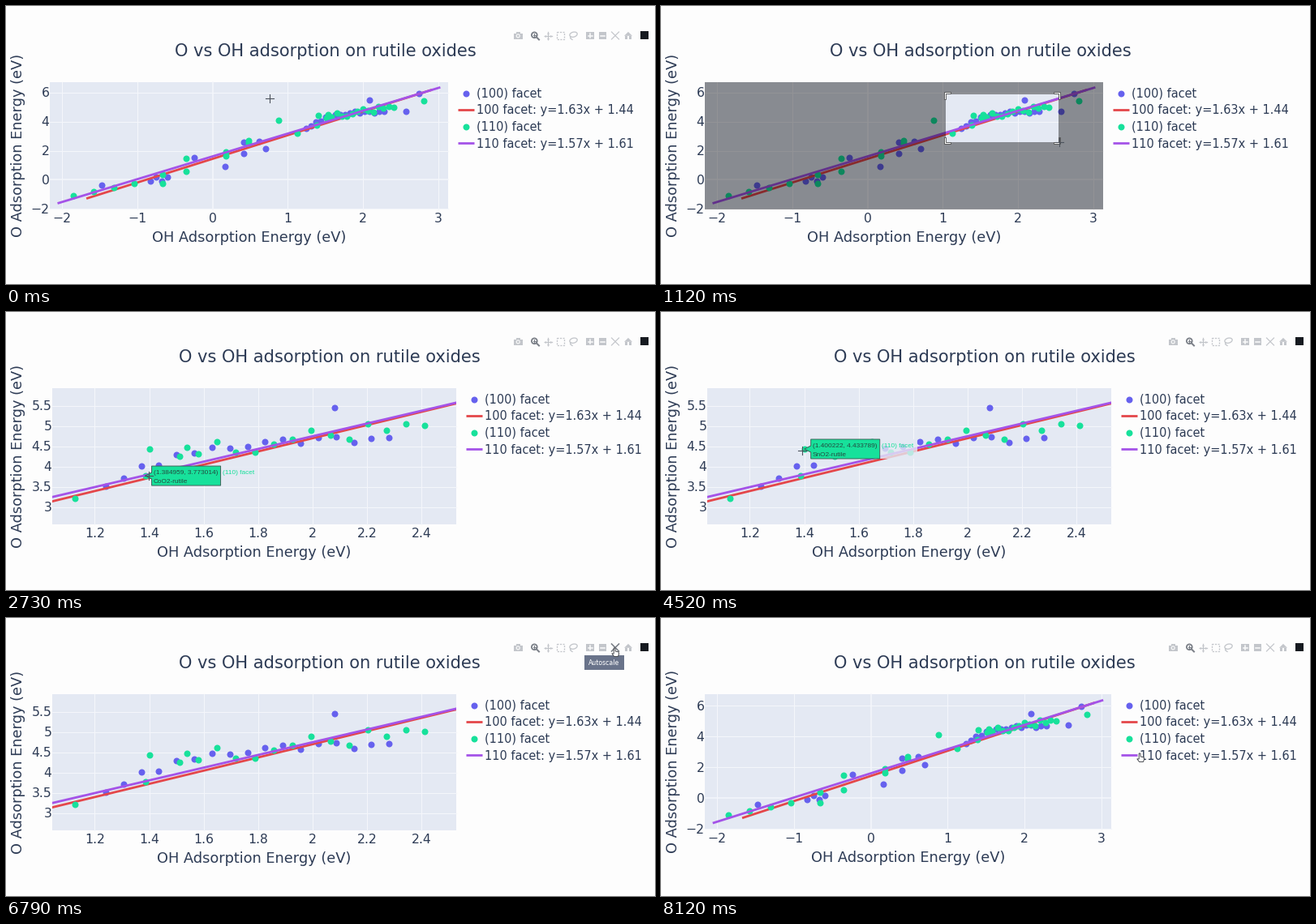
These frames come from a looping animation (800x343 px, 8180 ms). A matplotlib script:

```python
import numpy as np
import matplotlib.pyplot as plt
from matplotlib.animation import FuncAnimation
from matplotlib.patches import Circle, Ellipse, PathPatch, Polygon, Rectangle
from matplotlib.path import Path

W, H, DPI = 800, 343, 64
STEP, LOOP = 20, 8180
PT = 72 / DPI  # points per pixel

INK, PLOT_BG, GRID, PAGE = "#2d3b55", "#e4e9f3", "#f4f6fb", "#fdfdfd"
BLUE, RED, GREEN, VIOLET = "#6661ee", "#e4474a", "#17e19b", "#a453e8"

FADE_AT, DRAG_AT, ZOOM_AT, RESET_AT = 420, 480, 1300, 7000

# start, end, x, y, compound
HOVERS = [(2150, 3960, 1.384959, 3.773014, "CoO2"),
          (4240, 5440, 1.400222, 4.433789, "SnO2"),
          (5500, 5660, 1.53863, 4.471249, "HfO2")]

# start, end, destination of each pointer move
HOME, DRAG_FROM = np.array([325, 114]), np.array([351, 108.5])
MOVES = [(30, 400, DRAG_FROM), (DRAG_AT, 1040, (491, 168)), (1250, 2200, (176, 202)),
         (3730, 4480, (174, 171)), (5270, 6450, (750, 37)), (7200, 8060, (590, 167))]

rng = np.random.default_rng(4)


def run(n, x0, x1, rule, noise=0):
    x = np.linspace(x0, x1, n)
    return np.column_stack([x, rule(x) + rng.uniform(-noise, noise, n)])


def pair(x, y, gap):
    return [(x, y - gap), (x, y + gap)]


# strong binders lie on a loose line, weak binders level off into a cluster
FACET_100 = np.vstack([
    run(4, -.825, -.6, lambda x: .06 - .13 * np.cos(np.pi * (x + .825) / .075)),
    run(17, 1.24, 2.28, lambda x: 4.7 - 1.2 * np.exp((1.24 - x) / .28), .1),
    pair(.41, 2.19, .39),
    [(-1.47, -.39), (-.243, 1.52), (.166, .9), (.62, 2.67), (.705, 2.16)],
    [(2.081, 5.46), (2.57, 4.73), (2.735, 5.94)]])
FACET_110 = np.vstack([
    run(4, -1.85, -1.04, lambda x: x + .76),
    pair(-.664, .04, .32), pair(-.354, 1.01, .45),
    pair(.18, 1.76, .14), pair(.48, 2.6, .09),
    run(14, 1.51, 2.41, lambda x: 4.25 + .85 * (x - 1.5), .25),
    [h[2:4] for h in HOVERS],
    [(.877, 4.09), (1.126, 3.22), (2.81, 5.41)]])

fig = plt.figure(figsize=(W / DPI, H / DPI), dpi=DPI, facecolor=PAGE)
ax = fig.add_axes([0, 0, 1, 1])
ax.set(xlim=(0, W), ylim=(H, 0))
ax.axis("off")


def label(x, y, text, size, color=INK, ha="left", z=5, font="DejaVu Sans"):
    return ax.text(x, y + .36 * size, text, fontsize=size * PT, color=color,
                   ha=ha, va="baseline", family=font, zorder=z)


def line(xs, ys, color, width, z=3, **kw):
    return ax.plot(xs, ys, color=color, lw=width * PT, zorder=z, **kw)[0]


def dots(xs, ys, color, z=3):
    return ax.plot(xs, ys, "o", color=color, ms=8 * PT, mew=0, zorder=z)[0]


def box(x0, y0, x1, y1, color, z=1, **kw):
    return ax.add_patch(Rectangle((x0, y0), x1 - x0, y1 - y0, fc=color, lw=0,
                                  zorder=z, **kw))


def shape(points, color, z, **kw):
    return ax.add_patch(Polygon(points, fc=color, zorder=z, **kw))


def tick_text(v):
    return f"{round(v, 1):g}".replace("-", "\u2212")


class View:
    """The whole chart for one pair of axis ranges."""

    def __init__(self, rect, xlim, ylim, xticks, yticks):
        self.rect, self.xlim, self.ylim = rect, xlim, ylim
        left, top, right, bottom = rect
        self.area = box(*rect, PLOT_BG)
        self.parts = [self.area]
        self.add_grid(xticks, yticks)
        self.add_traces()
        self.add_legend(right + 22.3)
        mid_x, mid_y = (left + right) / 2, (top + bottom) / 2
        self.parts += [
            label(right / 2 + 121.5, 54, "O vs OH adsorption on rutile oxides", 21,
                  ha="center"),
            label(mid_x, bottom + 34, "OH Adsorption Energy (eV)", 17.7, ha="center"),
            ax.text(20.2, mid_y, "O Adsorption Energy (eV)", color=INK,
                    fontsize=17.7 * PT, family="DejaVu Sans", rotation=90,
                    rotation_mode="anchor", ha="center", va="baseline")]

    def to_px(self, x, y):
        left, top, right, bottom = self.rect
        (x0, x1), (y0, y1) = self.xlim, self.ylim
        return (left + (right - left) * (x - x0) / (x1 - x0),
                bottom - (bottom - top) * (y - y0) / (y1 - y0))

    def add_grid(self, xticks, yticks):
        left, top, right, bottom = self.rect
        for t in xticks:
            x = self.to_px(t, 0)[0]
            self.parts += [line([x, x], [top, bottom], GRID, 1.6 if t == 0 else 1.1, 2),
                           label(x, bottom + 10.4, tick_text(t), 15.6, ha="center")]
        for t in yticks:
            y = self.to_px(0, t)[1]
            self.parts += [line([left, right], [y, y], GRID, 1.6 if t == 0 else 1.1, 2),
                           label(left - .5, y, tick_text(t), 15.6, ha="right")]

    def add_traces(self):
        red, violet = np.array([-1.66, 2.9]), np.array([-2.043, 3.01])
        traces = [
            dots(*self.to_px(*FACET_100.T), BLUE, 3),
            line(*self.to_px(red, 1.63 * red + 1.44), RED, 2.8, 3.1),
            dots(*self.to_px(*FACET_110.T), GREEN, 3.2),
            line(*self.to_px(violet, 1.57 * violet + 1.61), VIOLET, 2.8, 3.3)]
        for a in traces:
            a.set_clip_path(self.area)
        self.parts += traces

    def add_legend(self, x):
        rows = [("(100) facet", BLUE), ("100 facet: y=1.63x + 1.44", RED),
                ("(110) facet", GREEN), ("110 facet: y=1.57x + 1.61", VIOLET)]
        for i, (text, color) in enumerate(rows):
            y = 107.5 + 20.6 * i
            mark = (line([x - 10, x + 10], [y, y], color, 2.8, solid_capstyle="butt")
                    if i % 2 else dots([x], [y], color))
            self.parts += [mark, label(x + 13.2, y, text, 14.55)]


def build_toolbar():
    y, grey, dark = 36.5, "#c3c6cb", "#7b8088"
    parts = []

    def stroke(xs, ys, color=grey, width=1.3, **kw):
        parts.append(line(xs, ys, color, width, 6, **kw))

    def fill(x0, y0, x1, y1, color=grey):
        parts.append(box(x0, y0, x1, y1, color, 6))

    def outline(p, color=grey, width=1.3):
        p.set(facecolor="none", edgecolor=color, linewidth=width * PT, zorder=7)
        parts.append(ax.add_patch(p))

    # camera
    fill(626, y - 3, 636.5, y + 4)
    fill(629, y - 4.5, 633.5, y - 3)
    outline(Circle((631.2, y + .4), 2), PAGE, 1.1)
    # magnifier
    outline(Circle((651.3, y - .7), 3.4), dark, 1.8)
    stroke([653.8, 657], [y + 1.8, y + 5], dark, 2)
    stroke([649.6, 653], [y - .7] * 2, dark, 1)
    stroke([651.3] * 2, [y - 2.4, y + 1], dark, 1)
    # pan
    stroke([663.5, 672.5], [y, y])
    stroke([668, 668], [y - 4.5, y + 4.5])
    for angle, mark in zip(range(4), ">v<^"):
        turn = 4 * np.exp(.5j * np.pi * angle)
        stroke([668 + turn.real], [y + turn.imag], marker=mark, ms=2.8 * PT, mew=0)
    # box select and lasso
    outline(Rectangle((679, y - 4.5), 9, 9, ls=(0, (1.6, 1.1))))
    outline(Ellipse((699.5, y - 1.3), 9.5, 6, angle=-15))
    stroke([696, 695.6, 698], [y + 1.2, y + 3.2, y + 5])
    # zoom in and out
    for x in (720, 735.5):
        fill(x - 4.6, y - 4.6, x + 4.6, y + 4.6)
        stroke([x - 2.5, x + 2.5], [y, y], PAGE, 1.5)
    stroke([720, 720], [y - 2.5, y + 2.5], PAGE, 1.5)
    # autoscale
    for s in (-1, 1):
        stroke([746.5, 755.5], [y - 4.5 * s, y + 4.5 * s], width=1.2)
    # home
    parts.append(shape([(762, y + .3), (767, y - 4.6), (772, y + .3)], grey, 6, lw=0))
    fill(763.4, y, 766, y + 4.4)
    fill(768, y, 770.6, y + 4.4)
    # maker's badge
    fill(782.3, y - 5.2, 792.3, y + 4.8, "#161a20")
    return parts


def ramp(t, start, length):
    return min(max((t - start) / length, 0), 1)


def pointer(t):
    """Smooth moves between stops; the vertical part trails a little."""
    pos = HOME
    for start, end, goal in MOVES:
        u = ramp(t, start, end - start)
        s = u * u * (3 - 2 * u)
        pos = pos + (np.array(goal) - pos) * (s, s ** 1.37)
    return pos


def rect_points(x0, y0, x1, y1):
    return [(x0, y0), (x1, y0), (x1, y1), (x0, y1), (x0, y0)]


def show(parts, on):
    for a in parts:
        a.set_visible(on)


WIDE = dict(xlim=(-2.16, 3.128), ylim=(-2.01, 6.74),
            xticks=range(-2, 4), yticks=range(-2, 7, 2))
views = [View((54, 93.5, 545, 250.5), **WIDE),
         View((57, 94, 555, 262), (1.0437, 2.5267), (2.574, 5.934),
              np.arange(1.2, 2.5, .2), np.arange(3, 5.6, .5)),
         View((54, 94, 555, 260.5), **WIDE)]
toolbar = build_toolbar()

# zoom selection
shade = ax.add_patch(PathPatch(Path(rect_points(0, 0, 1, 1)), fc="black", lw=0, zorder=8))
CORNER = np.array([(-2.4, -2.4), (6, -2.4), (6, -.4), (-.4, -.4), (-.4, 6), (-2.4, 6)])
corners = [shape(CORNER, "white", 9, ec="#444444", lw=.8 * PT) for _ in range(4)]

# hover label
veil = box(0, 0, 46, 24, PLOT_BG, 10, alpha=.8)
tag = shape(CORNER, GREEN, 11, ec="#3a5a52", lw=.9 * PT)
value, name, facet = [label(0, 0, s, 8.3, c, z=12, font="Liberation Sans")
                      for s, c in [("", "#234a40"), ("", "#234a40"), ("(110) facet", GREEN)]]

# button tooltip, with the button lit
tip = [box(712.5, 46, 762, 63.5, "#69738a", 12),
       shape([(748, 46.2), (751, 43), (754, 46.2)], "#69738a", 12, lw=0),
       label(737.2, 54.8, "Autoscale", 7.8, "white", "center", 13)]
tip += [line([746.5, 755.5], [36.5 - 4.5 * s, 36.5 + 4.5 * s], "#7b8088", 1.5, 7)
        for s in (-1, 1)]

# pointers
cross = [line([0, 0], [0, 0], "#4c525c", 1.1, 20) for _ in range(2)]
HAND = np.array([(-.8, 0), (.9, 0), (1.2, 4), (5, 4.8), (5.6, 7.5), (4.4, 10.5),
                 (-.4, 10.5), (-3.2, 6.8), (-.8, 7)])
hand = shape(HAND, "white", 20, ec="#3c3f45", lw=.9 * PT)


def draw_selection(t, x, y):
    show([shade, *corners], DRAG_AT < t < ZOOM_AT)
    x0, y0 = DRAG_FROM
    x1, y1 = max(x - 1, x0 + .5), max(y, y0 + .5)
    outer = rect_points(*views[0].rect)
    hole = rect_points(x0, y0, x1, y1)[::-1]
    codes = [Path.MOVETO] + [Path.LINETO] * 3 + [Path.CLOSEPOLY]
    shade.set_path(Path(outer + hole, codes * 2))
    shade.set_alpha(.4 * ramp(t, DRAG_AT, 200))
    spots = [(cx, cy, sx, sy) for cx, sx in ((x0, 1), (x1, -1))
             for cy, sy in ((y0, 1), (y1, -1))]
    for c, (cx, cy, sx, sy) in zip(corners, spots):
        c.set_xy(CORNER * (sx, sy) + (cx, cy))


def draw_hover(t):
    now = next((h for h in HOVERS if h[0] <= t < h[1]), None)
    show([veil, tag, value, name, facet], now is not None)
    if now is None:
        return
    vx, vy, compound = now[2:]
    px, py = views[1].to_px(vx, vy)
    text = f"({vx}, {vy})"
    x0, y0, y1 = px + 8, py - 12, py + 12
    x1 = x0 + 4.25 * len(text)
    tag.set_xy([(px, py), (x0, py - 4), (x0, y0), (x1, y0), (x1, y1), (x0, y1),
                (x0, py + 4)])
    veil.set_xy((x1, y0))
    value.set_text(text)
    name.set_text(f"{compound}-rutile")
    for a, x, y in [(value, x0 + 2.3, py - 2), (name, x0 + 2.3, py + 9),
                    (facet, x1 + 2, py - 2)]:
        a.set_position((x, y))


def draw_pointer(view, x, y):
    left, top, right, bottom = view.rect
    in_plot = left < x < right and top < y < bottom
    show(cross, in_plot)
    hand.set_visible(not in_plot)
    cross[0].set_data([x - 4.7, x + 4.7], [y, y])
    cross[1].set_data([x, x], [y - 4.7, y + 4.7])
    hand.set_xy(HAND + (x, y))
    show(tip, 742 < x < 759 and y < 44)


def update(i):
    t = i * STEP
    stage = int(t >= ZOOM_AT) + int(t >= RESET_AT)
    for k, view in enumerate(views):
        show(view.parts, k == stage)
    for a in toolbar:
        a.set_alpha(1 - ramp(t, FADE_AT, 200) + ramp(t, ZOOM_AT, 200))
    x, y = pointer(t)
    draw_selection(t, x, y)
    draw_hover(t)
    draw_pointer(views[stage], x, y)
    return []


anim = FuncAnimation(fig, update, frames=LOOP // STEP, interval=STEP,
                     repeat=True, repeat_delay=0, blit=False)
plt.show()
```
